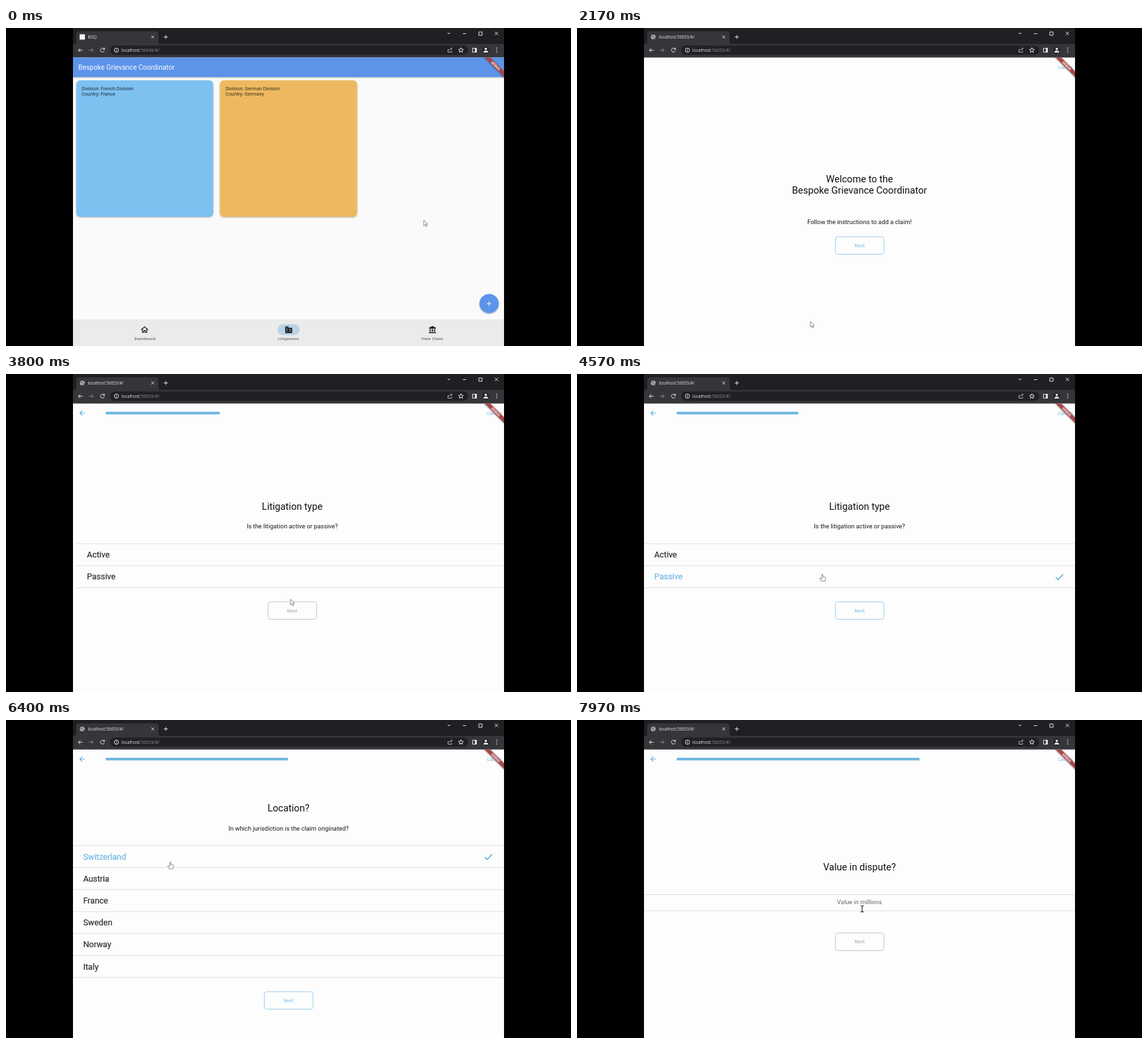
Write an HTML page that moves like this. It is 852 px wide and 480 px high and loops after 8 s.

```html
<!DOCTYPE html>
<html lang="en">
<head>
<meta charset="utf-8">
<title>Claim assistant</title>
<style>
html, body { margin: 0; width: 100%; height: 100%; overflow: hidden; background: #000; }
svg { display: block; width: 100vw; height: 100vh; }
text { font-family: Roboto, sans-serif; white-space: pre; }
.ui { font-family: "Open Sans", sans-serif; font-size: 6.2px; fill: #e4e5e8; }
.dim { fill: #8b8d92; }
.mid { text-anchor: middle; }
.title { font-size: 14.56px; fill: #101012; }
.body { font-size: 9.36px; fill: #18181a; }
.row { font-size: 12.48px; fill: #2c2c2f; stroke: #2c2c2f; stroke-width: .2px; }
.card { font-size: 7.28px; }
.nav { font-size: 6.1px; letter-spacing: .3px; fill: #48484a; }
.btn { font-size: 7.28px; letter-spacing: .05px; }
.line { stroke: #d9d9e0; stroke-width: .8; fill: none; }
.icon { fill: none; stroke: #dfe1e5; stroke-width: 1; }
.button rect { fill: none; stroke: #bfbfc6; stroke-width: .9; }
.button text { fill: #a5a5ac; }
.button.on rect { stroke: #93c8ee; }
.button.on text { fill: #74b8e8; }
.button.hover rect { fill: #f5fafe; }
.tick { fill: none; stroke: #67b4e4; stroke-width: 1.7; visibility: hidden; }
.chosen .row { fill: #6cb6e6; stroke: #6cb6e6; }
.chosen .tick { visibility: visible; }
</style>
</head>
<body>
<svg viewBox="0 0 852 480" xmlns="http://www.w3.org/2000/svg">
  <defs>
    <clipPath id="view"><rect x="101" y="44.5" width="650" height="436"/></clipPath>
    <filter id="shadow" x="-20%" y="-20%" width="140%" height="140%">
      <feDropShadow dx="0" dy="1" stdDeviation="1.3" flood-color="#000" flood-opacity=".3"/>
    </filter>
  </defs>
  <rect width="852" height="480"/>

  <g id="browser">
    <rect x="101" width="650" height="25" fill="#1f2023"/>
    <path d="M101 24H103Q106 24 106 20V9Q106 5 110 5H226Q230 5 230 9V20Q230 24 233 24H751V44.5H101Z" fill="#35363a"/>
    <rect x="157" y="26.5" width="540" height="14" rx="7" fill="#202124"/>
    <rect id="tabMark" x="111" y="9.5" width="8" height="8" fill="#f4f5f6"/>
    <g id="globe">
      <circle cx="115" cy="13.5" r="3.6" fill="#b4b6ba"/>
      <path d="M112.5 12.5l2 1 1-2.5M115 16.5l1.5-2 1.5 .5" stroke="#35363a" fill="none"/>
    </g>
    <text id="tabName" class="ui" x="123.5" y="15.7"></text>
    <path class="icon" d="M219.3 11.5l4 4m0-4l-4 4M238 13.5h6m-3-3v6M666 7l2 2 2-2M689 8.5h5M713 6h5v5h-5zM737 5.7l5 5m0-5l-5 5"/>
    <path class="icon" d="M115.5 33.5h-6.5m3-3l-3 3 3 3M148 31.7a3 3 0 1 0 .3 2.8M148.5 30v2.3h-2.3"/>
    <path class="icon" d="M124.8 33.5h6.5m-3-3l3 3-3 3" opacity=".45"/>
    <circle class="icon" cx="166.5" cy="33.5" r="3.2" stroke-width=".8"/>
    <path class="icon" d="M166.5 33v2.2m0-4v.8" stroke-width=".8"/>
    <text class="ui" x="174" y="35.8" style="font-size:6.6px">localhost<tspan id="port" class="dim"></tspan></text>
    <path class="icon" d="M668 32.5h-1.5v4h5.5v-2M669 34q.5-3 3.5-3m-1.5-1.5l1.7 1.5-1.7 1.5" stroke-width=".8" opacity=".75"/>
    <path class="icon" d="M686 29.7l1.1 2.4 2.6 .2-2 1.7 .7 2.6-2.4-1.4-2.4 1.4 .7-2.6-2-1.7 2.6-.2z" stroke-width=".8"/>
    <path class="icon" d="M703.5 30.5h6v6h-6z"/><path d="M707 30h3v7h-3z" fill="#dfe1e5"/>
    <circle cx="723.5" cy="33.3" r="5" fill="#222326"/>
    <g fill="#eceef0"><circle cx="723.5" cy="31.5" r="1.8"/><path d="M720 37q0-3 3.5-3t3.5 3z"/>
      <circle cx="740" cy="30.3" r=".8"/><circle cx="740" cy="33.3" r=".8"/><circle cx="740" cy="36.3" r=".8"/></g>
  </g>

  <g clip-path="url(#view)">
    <rect id="paper" x="101" y="44" width="650" height="436"/>
    <g id="home">
      <rect x="101" y="44" width="650" height="30" fill="#5c94ea" filter="url(#shadow)"/>
      <text x="109" y="62.9" font-size="10.4" fill="#fafbfd">Bespoke Grievance Coordinator</text>
      <g filter="url(#shadow)">
        <rect x="106" y="79" width="206.5" height="206" rx="6.2" fill="#7cc1f0"/>
        <rect x="322.5" y="79" width="207" height="206" rx="6.2" fill="#edb960"/>
      </g>
      <g class="card" fill="#1c2f3c">
        <text x="114" y="94.2">Division: French Division</text><text x="114" y="102.3">Country: France</text>
      </g>
      <g class="card" fill="#3a2d18">
        <text x="331" y="94.2">Division: German Division</text><text x="331" y="102.3">Country: Germany</text>
      </g>
      <circle cx="728.5" cy="416" r="14.6" fill="#5c94ea" filter="url(#shadow)"/>
      <path d="M725 416h7m-3.5-3.5v7" stroke="#f4f6fa" stroke-width="1.1"/>
      <rect x="101" y="440" width="650" height="40" fill="#ebebeb"/>
      <rect x="409.5" y="447" width="33.3" height="16.6" rx="8.3" fill="#b9d4e6"/>
      <path d="M204 455.5l5-4.5 5 4.5M205.7 454.5v5h2.2v-3h2.2v3h2.2v-5" fill="none" stroke="#1c1c1e" stroke-width="1.2"/>
      <path d="M421 450.5h5v2h5.5v8H421z" fill="#1c1c1e"/>
      <path d="M422.3 453h2.5m-2.5 2.5h2.5m-2.5 2.5h2.5m1.7-3h3.5m-3.5 2.5h3.5" stroke="#b9d4e6" stroke-width=".8"/>
      <path d="M643 449.8l5.3 2.8v1.2h-10.6v-1.2zM638.8 454.6h1.7v3.6h-1.7zM642.2 454.6h1.7v3.6h-1.7zM645.6 454.6h1.7v3.6h-1.7zM637.7 459h10.6v1.6h-10.6z" fill="#1c1c1e"/>
      <g class="nav mid"><text x="209.5" y="470.5">Dashboard</text><text x="426" y="470.5">Litigations</text><text x="643" y="470.5">View Claim</text></g>
    </g>

    <g id="survey">
      <g id="pages"></g>
      <g id="progress">
        <path d="M119 59h-7.5m3.6-3.6l-3.6 3.6 3.6 3.6" fill="none" stroke="#5fb0e2" stroke-width="1.2"/>
        <rect id="bar" x="150.5" y="57" height="4" fill="#70b9e0"/>
      </g>
      <text x="725" y="61.6" font-size="7.28" fill="#7dbce6">Cancel</text>
    </g>

    <g transform="translate(751 44.5) rotate(45)">
      <rect x="-30" y="14.6" width="60" height="6.2" fill="#a5464a" filter="url(#shadow)"/>
      <text class="mid" y="19.6" font-size="5.2" font-weight="900" fill="#f4e6e6">DEBUG</text>
    </g>
  </g>

  <g id="pointer" stroke="#5a5a60" stroke-width=".7" fill="#fff">
    <path id="arrow" d="M0 0V8.5L2 6.7 3.4 9.8 4.8 9.2 3.4 6.2H6Z"/>
    <path id="hand" d="M-.8 .7Q0 -.5 .8 .7V4L4.2 4.8Q5 5.1 4.9 6.2L4 10.8H-1.2L-4 7Q-3.8 5.8 -2.4 6.3L-.8 7.3Z"/>
    <path id="beam" d="M-2.5 -4.7Q0 -4.7 0 -3.7Q0 -4.7 2.5 -4.7M0 -3.7V3.7M-2.5 4.7Q0 4.7 0 3.7Q0 4.7 2.5 4.7" fill="none" stroke="#1c1c1e" stroke-width="1.1"/>
  </g>
</svg>

<script>
const $ = id => document.getElementById(id);
const LOOP = 8000, CUT = 1130, SLIDE = 400, WIDTH = 650;
const slides = [3450, 5044, 6900];
const PASSIVE_AT = 4400, SWISS_AT = 6330;

// Page markup
const label = (cls, y, size, s) => `<text class="${cls} mid" x="426" y="${y + size * .355}">${s}</text>`;
const title = (y, s) => label('title', y, 14.56, s);
const body = (y, s) => label('body', y, 9.36, s);
const button = (id, y) => `<g id="${id}" class="button"><rect x="389.5" y="${y}" width="73.5" height="26.5" rx="4"/>
  ${label('btn', y + 13.3, 7.28, 'Next')}</g>`;
const rule = y => `<path class="line" d="M101 ${y}H751"/>`;
const list = (id, top, names) => `<g id="${id}">` + rule(top) + names.map((name, i) => {
  const y = top + 33.2 * i;
  return `<g id="${name}"><text class="row" x="116.4" y="${y + 20.9}">${name}</text>
    <path class="tick" d="M722 ${y + 17.5}l3.5 3.5 7.5-8"/></g>` + rule(y + 33.2);
}).join('') + '</g>';

const pageMarkup = [
  title(228, 'Welcome to the') + title(245, 'Bespoke Grievance Coordinator') +
    body(293, 'Follow the instructions to add a claim!') + button('next0', 315),
  title(199.5, 'Litigation type') + body(230, 'Is the litigation active or passive?') +
    list('types', 256.2, ['Active', 'Passive']) + button('next1', 343.8),
  title(133, 'Location?') + body(163.5, 'In which jurisdiction is the claim originated?') +
    list('places', 189.6, ['Switzerland', 'Austria', 'France', 'Sweden', 'Norway', 'Italy']) + button('next2', 410),
  title(221.5, 'Value in dispute?') + '<rect class="line" x="101" y="263.5" width="650" height="24.5"/>' +
    `<g fill-opacity=".65">${body(275, 'Value in millions')}</g>` +
    '<path id="caret" d="M426 270v10" stroke="#6cb6e6"/>' + button('next3', 321.5)
];
$('pages').innerHTML = pageMarkup.map(s => `<g>${s}</g>`).join('');
const pages = [...$('pages').children];

// Pointer stops: time, x, y, shape
const stops = [
  [0, 630, 290, 'arrow'], [100, 630, 290, 'arrow'], [800, 727, 412, 'hand'], [CUT - 1, 727, 412, 'hand'],
  [CUT, 352, 443, 'arrow'], [2170, 352, 443, 'arrow'], [2700, 429, 340, 'hand'], [3600, 429, 340, 'arrow'],
  [3900, 429, 340, 'arrow'], [4250, 370, 302, 'hand'], [4700, 370, 302, 'hand'], [4980, 441, 357, 'hand'],
  [5150, 441, 357, 'arrow'], [5570, 441, 357, 'arrow'], [6150, 246, 212, 'hand'], [6385, 246, 212, 'hand'],
  [6640, 403, 382, 'hand'], [6760, 403, 382, 'hand'], [6860, 423, 417, 'hand'], [6990, 423, 417, 'arrow'],
  [7400, 423, 417, 'arrow'], [7800, 430, 285, 'beam'], [LOOP, 430, 285, 'beam']
];

const clamp = v => Math.min(1, Math.max(0, v));
const smooth = v => v * v * (3 - 2 * v);
const show = (el, on) => { el.style.display = on ? '' : 'none'; };

// cubic-bezier(.25, .1, .25, 1)
function ease(x) {
  let lo = 0, hi = 1;
  for (let i = 0; i < 22; i++) {
    const s = (lo + hi) / 2;
    if (.75 * s - .75 * s * s + s ** 3 < x) lo = s; else hi = s;
  }
  return .3 * lo * (1 - lo) ** 2 + 3 * (1 - lo) * lo * lo + lo ** 3;
}

function drawPointer(t) {
  const i = Math.max(0, stops.findIndex(s => s[0] > t) - 1);
  const a = stops[i], b = stops[i + 1];
  const p = (t - a[0]) / (b[0] - a[0]), k = smooth(p);
  const shape = p > .8 ? b[3] : a[3];
  $('pointer').setAttribute('transform', `translate(${a[1] + (b[1] - a[1]) * k} ${a[2] + (b[2] - a[2]) * k})`);
  for (const id of ['arrow', 'hand', 'beam']) show($(id), id === shape);
}

function drawPages(t) {
  const step = slides.filter(s => t >= s).length;
  const p = step ? clamp((t - slides[step - 1]) / SLIDE) : 1;
  const off = step ? WIDTH * (1 - ease(p)) : 0;
  pages.forEach((page, i) => {
    const current = i === step, leaving = i === step - 1 && p < 1;
    show(page, current || leaving);
    const x = current ? off : off - WIDTH - Math.min(8, off * .2);
    page.setAttribute('transform', `translate(${x} 0)`);
  });
  // the list settles a little behind its page
  $('places').setAttribute('transform', `translate(${step === 2 ? Math.min(7, off * 1.6) : 0} 0)`);
  show($('progress'), step > 0);
  $('bar').setAttribute('width', 91.5 * Math.max(0, step + p));
}

function render(t) {
  const home = t < CUT;
  show($('home'), home);
  show($('survey'), !home);
  show($('tabMark'), home);
  show($('globe'), !home);
  $('paper').setAttribute('fill', home ? '#fafafa' : '#fdfdfd');
  $('tabName').textContent = home ? 'BGQ' : 'localhost:56653/#/';
  $('port').textContent = home ? ':56446/#/' : ':56653/#/';
  drawPages(t);
  const passive = t >= PASSIVE_AT, swiss = t >= SWISS_AT;
  $('Passive').classList.toggle('chosen', passive);
  $('Switzerland').classList.toggle('chosen', swiss);
  [true, passive, swiss, false].forEach((on, i) => $('next' + i).classList.toggle('on', on));
  $('next0').classList.toggle('hover', t > 2600 && t < 3700);
  show($('caret'), t >= 6950 && t < 7450);
  drawPointer(t);
}

const start = performance.now();
(function frame() {
  render((performance.now() - start) % LOOP);
  requestAnimationFrame(frame);
})();
</script>
</body>
</html>
```
